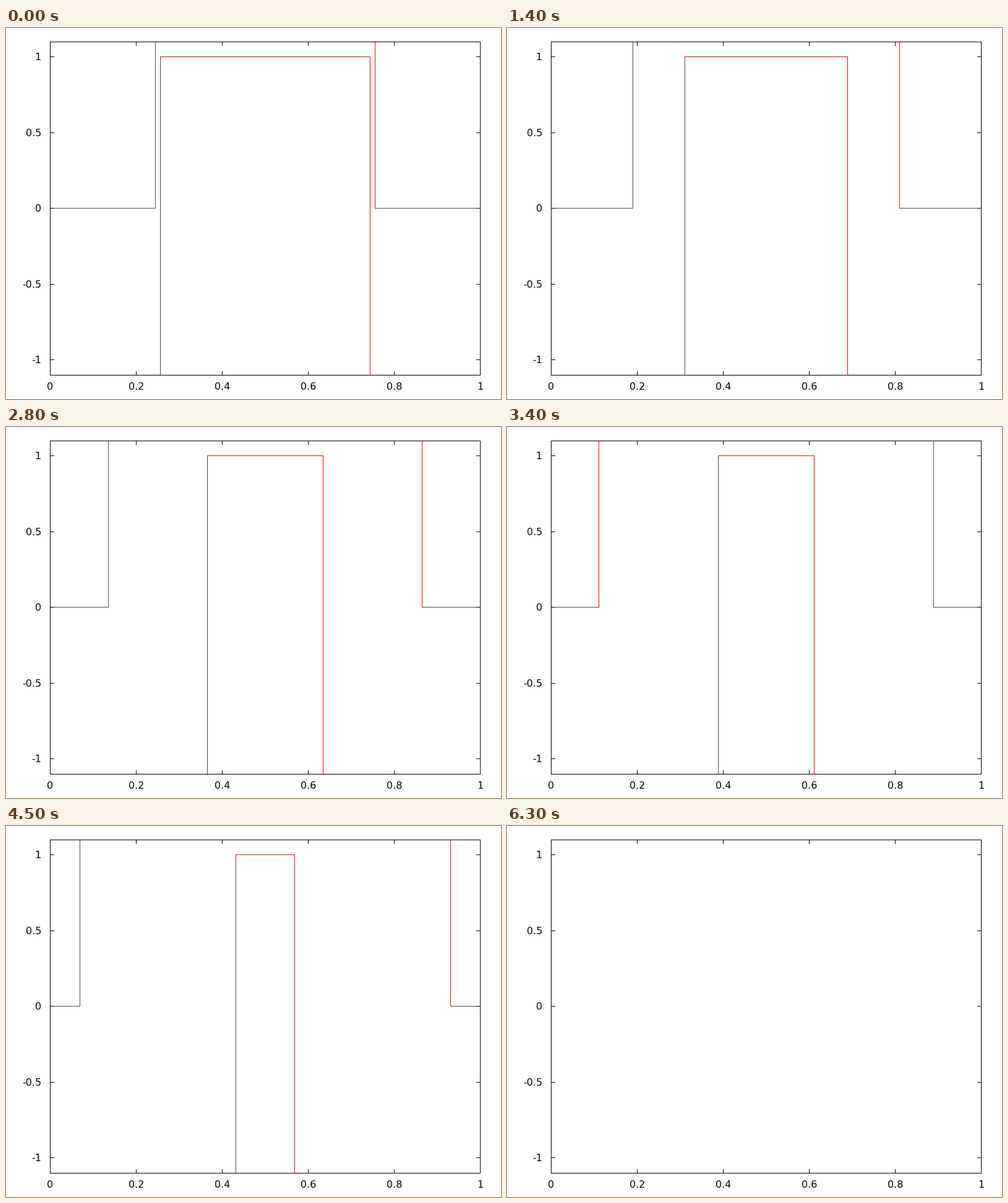
Recreate the animation shown at these times as a matplotlib script. Size 800 by 600 pixels, loop 7.2 s.

```python
import matplotlib.pyplot as plt
from matplotlib.animation import FuncAnimation
from matplotlib.patches import Rectangle

W, H, DPI = 800, 600, 100
LEFT, RIGHT, TOP, BOTTOM = 71, 766, 22, 561
FRAMES, INTERVAL = 72, 100
STEPS = 63          # moving steps before the plot stays empty
GRID = 256
RED, DARK, BLACK = "#ff0000", "#4c4c4c", "#000000"
TICK = 6

fig = plt.figure(figsize=(W / DPI, H / DPI), dpi=DPI, facecolor="white")
ax = fig.add_axes([0, 0, 1, 1])
ax.set_xlim(0, W)
ax.set_ylim(H, 0)
ax.axis("off")


def px(x):
    return round(LEFT + (RIGHT - LEFT) * x)


def py(y):
    return int((TOP + BOTTOM) / 2 - (BOTTOM - TOP) / 2.2 * y)


def bar(z):
    r = Rectangle((0, 0), 0, 0, lw=0, antialiased=False, zorder=z)
    ax.add_patch(r)
    return r


def place(r, x0, y0, x1, y1, color):
    """Fill the pixels from (x0, y0) to (x1, y1), both included."""
    r.set_bounds(x0, y0, x1 - x0 + 1, y1 - y0 + 1)
    r.set_facecolor(color)


def ink(pos):
    """Thin lines are red on even pixels and dark on odd ones."""
    return DARK if pos % 2 else RED


def hline(r, x0, x1, y, color=None):
    place(r, x0, y, x1, y, color or ink(y))


def vline(r, x, y0, y1, color=None):
    place(r, x, y0, x, y1, color or ink(x))


def draw_frame():
    for y in (TOP, BOTTOM):
        hline(bar(3), LEFT, RIGHT, y, BLACK)
    for x in (LEFT, RIGHT):
        vline(bar(3), x, TOP, BOTTOM, BLACK)

    font = dict(family="DejaVu Sans", size=16 * 72 / DPI, color=BLACK,
                va="baseline")
    for i in range(6):
        x = px(i / 5)
        vline(bar(3), x, TOP, TOP + TICK, BLACK)
        vline(bar(3), x, BOTTOM - TICK, BOTTOM, BLACK)
        ax.text(x + 0.5, 585, f"{i / 5:g}", ha="center", **font)
    for i in range(-2, 3):
        y = py(i / 2)
        hline(bar(3), LEFT, LEFT + TICK, y, BLACK)
        hline(bar(3), RIGHT - TICK, RIGHT, y, BLACK)
        ax.text(57, y + 6, f"{i / 2:g}", ha="right", **font)


draw_frame()
curve = [bar(2) for _ in range(7)]


def update(i):
    shown = i < STEPS
    for r in curve:
        r.set_visible(shown)
    if not shown:
        return curve

    # Fronts leave x = 0.25 both ways, mirrored around the middle.
    d = (i + 1.5) / GRID
    outer, inner = px(0.25 - d), px(0.25 + d)
    outer_r, inner_r = LEFT + RIGHT - outer, LEFT + RIGHT - inner
    zero, one = py(0), py(1)

    vline(curve[0], outer, TOP + 1, zero)
    vline(curve[1], outer_r, TOP + 1, zero)
    vline(curve[2], inner, one, BOTTOM - 1)
    vline(curve[3], inner_r, one, BOTTOM - 1)
    hline(curve[4], LEFT + 1, outer, zero)
    hline(curve[5], outer_r, RIGHT - 1, zero)
    hline(curve[6], inner, inner_r, one)
    return curve


anim = FuncAnimation(fig, update, frames=FRAMES, interval=INTERVAL,
                     repeat=True, repeat_delay=0, blit=False)
plt.show()
```
